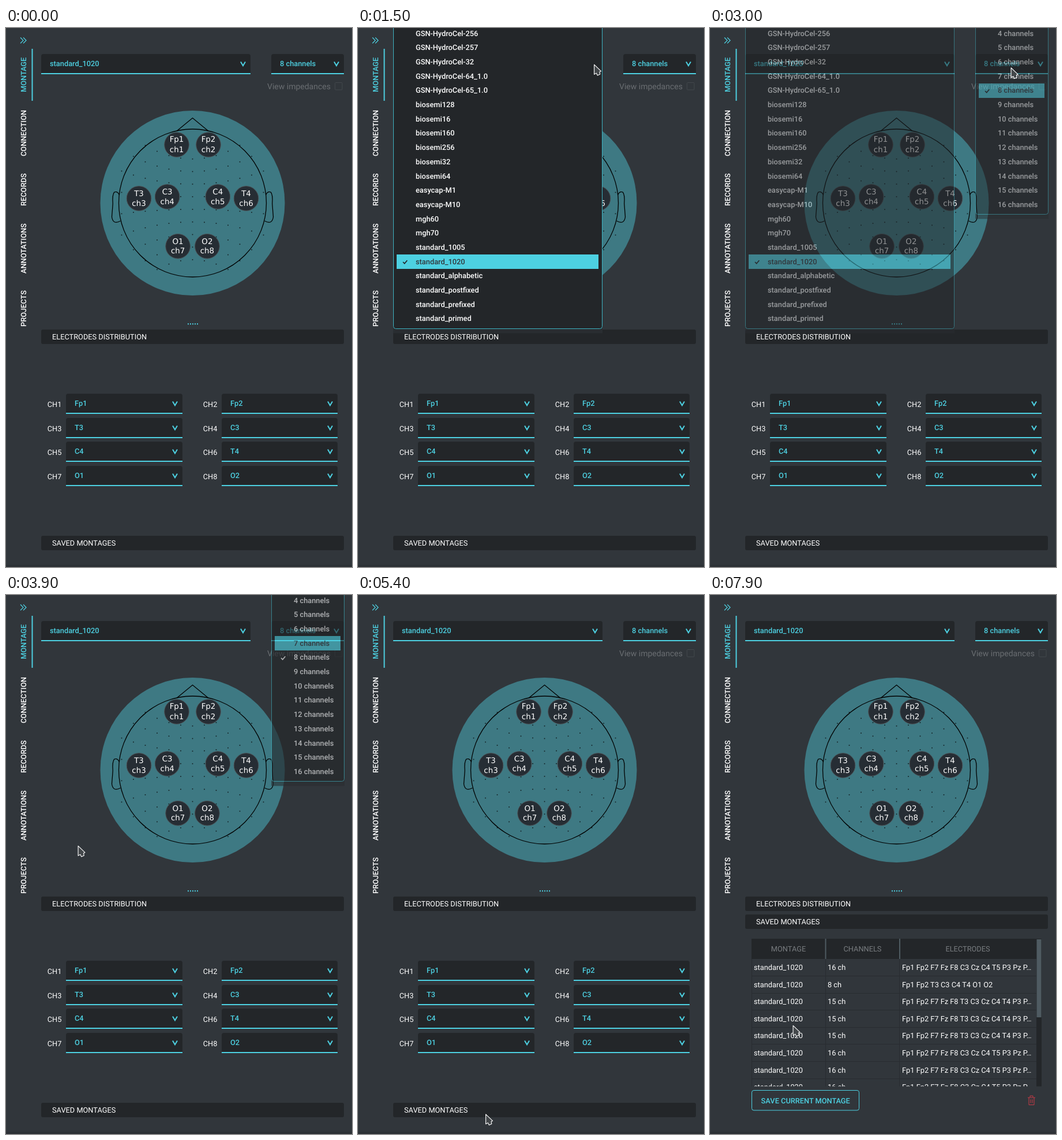
These frames come from a looping animation (600x933 px, 8000 ms). An HTML page:

```html
<!DOCTYPE html>
<html lang="en">
<head>
<meta charset="utf-8">
<title>Montage</title>
<style>
html, body { margin: 0; width: 100%; height: 100%; overflow: hidden; background: #31363b; }
svg { display: block; width: 100vw; height: 100vh; }
text { font: 12.8px Roboto, sans-serif; fill: #fff; white-space: pre; text-rendering: geometricPrecision; }
.bold { font-weight: 500; }
.cyan { fill: #4dd0e1; }
.dark { fill: #31363b; }
.dim { fill: #6a6e72; font-size: 14px; }
.head { fill: #797d80; text-anchor: middle; }
.sensor { font: 13.4px "DejaVu Sans", sans-serif; text-anchor: middle; }
.line { fill: none; stroke: #4dd0e1; }
.ink { fill: none; stroke: #000; stroke-width: 1.3; }
</style>
</head>
<body>
<svg id="stage" viewBox="0 0 600 933" preserveAspectRatio="none"></svg>
<script>
const CYAN = '#4dd0e1', PANEL = '#232629', GRID = '#282c30', SLATE = '#4f5b62';
const ROW = 24.67, FIRST_ROW = 9.3;

const text = (x, y, str, cls = '', extra = '') => `<text x="${x}" y="${y}" class="${cls}" ${extra}>${str}</text>`;
const rect = (x, y, w, h, fill, extra = '') => `<rect x="${x}" y="${y}" width="${w}" height="${h}" fill="${fill}" ${extra}/>`;
const circle = (x, y, r, extra) => `<circle cx="${x}" cy="${y}" r="${r}" ${extra}/>`;
const path = (d, cls, extra = '') => `<path d="${d}" class="${cls}" ${extra}/>`;
const group = (id, body) => `<g id="${id}">${body}</g>`;
const range = n => [...Array(n).keys()];
const clamp = v => Math.min(1, Math.max(0, v));

function combo(x, y, w, label) {
  return path(`M${x} ${y + 35}v-31q0-4 4-4h${w - 8}q4 0 4 4v31z`, '', `fill="${PANEL}"`) +
    rect(x, y + 33, w, 2, CYAN) +
    text(x + 15, y + 21.3, label, 'bold cyan') +
    path(`M${x + w - 17} ${y + 13.5}l4 6.8l4-6.8`, 'line', 'stroke-width="2"');
}

const bar = (y, label) => rect(61, y, 525, 25, PANEL, 'rx="3"') + text(80, y + 17, label);

function sidebar() {
  const tabs = [['MONTAGE', 111], ['CONNECTION', 222], ['RECORDS', 308], ['ANNOTATIONS', 425], ['PROJECTS', 517]];
  return path('M25 16.5l5 5l-5 5M30 16.5l5 5l-5 5', 'line', 'stroke-width="1.2"') +
    rect(44.5, 36, 2, 90, CYAN) +
    tabs.map(([name, y], i) =>
      text(0, 0, name, i ? 'bold' : 'bold cyan', `transform="translate(34.8 ${y}) rotate(-90)"`)).join('');
}

// Sensor grid: rows bend away from the ears, columns are evenly spaced.
function sensorDots(radius) {
  return range(9).flatMap(row => range(13).map(col => {
    const x = (col - 6) * 20.5;
    const y = (row - 3.5) * (21.8 + 10 * (x / 100) ** 2);
    return Math.hypot(x, y) < radius ? rect(x - .8, y - .8, 1.6, 1.6, '#10191c') : '';
  })).join('');
}

function sensorPair(site, numbers, channels, dx, y, gap) {
  return [-1, 1].map((side, i) =>
    circle(side * dx, y, 21.3, 'fill="#262d34" stroke="#4b5054"') +
    text(side * dx, y + 4.3 - gap / 2, site + numbers[i], 'sensor') +
    text(side * dx, y + 4.3 + gap / 2, 'ch' + channels[i], 'sensor')).join('');
}

function scalp() {
  const ear = side => path('M127 -14Q130 -21 135.5 -19Q139.5 -15 138.2 1L140 24Q138 38 125 31', 'ink', `transform="scale(${side} 1)"`);
  return `<g transform="translate(323.5 303)">` +
    circle(0, 0, 160, 'fill="#3e7983"') + sensorDots(135) +
    circle(0, 0, 128, 'class="ink"') + path('M-27 -125L0 -147.2L27 -125', 'ink') + ear(1) + ear(-1) +
    sensorPair('Fp', [1, 2], [1, 2], 27.5, -101, 18) +
    sensorPair('T', [3, 4], [3, 6], 93, -8, 16.5) +
    sensorPair('C', [3, 4], [4, 5], 43.8, -11, 16.5) +
    sensorPair('O', [1, 2], [7, 8], 25.4, 74.8, 16.5) + '</g>';
}

function distribution() {
  return ['Fp1', 'Fp2', 'T3', 'C3', 'C4', 'T4', 'O1', 'O2'].map((name, i) => {
    const x = i % 2 ? 374 : 104, y = 633 + Math.round((i >> 1) * 41.6);
    return text(x - 32.3, y + 22.7, 'CH' + (i + 1)) + combo(x, y, 202 - i % 2, name);
  }).join('') + bar(879, 'SAVED MONTAGES');
}

function savedMontages() {
  const sets = {
    16: 'Fp1 Fp2 F7 Fz F8 C3 Cz C4 T5 P3 Pz P…',
    15: 'Fp1 Fp2 F7 Fz F8 T3 C3 Cz C4 T4 P3 P…',
    8: 'Fp1 Fp2 T3 C3 C4 T4 O1 O2'
  };
  const rows = [16, 8, 15, 15, 15, 16, 16, 16].map((n, i) => {
    const y = 649 + i * 29.6;
    return text(76, y, 'standard_1020') + text(204, y, n + ' ch') + text(333, y, sets[n]) +
      rect(72, Math.round(y + 10), 494, 1, GRID);
  }).join('');
  return bar(553, 'SAVED MONTAGES') +
    `<clipPath id="table"><rect x="72" y="595" width="503" height="255.5"/></clipPath><g clip-path="url(#table)">` +
    rows + [72, 200, 328].map(x => rect(x, 630, 1, 221, GRID)).join('') +
    rect(72, 595, 494, 35, PANEL) + rect(199.5, 595, 2, 35, SLATE) + rect(328, 595, 2, 35, SLATE) +
    text(136, 617, 'MONTAGE', 'head') + text(264.5, 617, 'CHANNELS', 'head') + text(447, 617, 'ELECTRODES', 'head') +
    rect(566, 595, 9, 256, PANEL) + rect(566.5, 596, 8, 135, SLATE) + '</g>' +
    rect(72.5, 857.5, 186, 34.5, 'none', `rx="3.5" stroke="${CYAN}"`) +
    text(165.7, 879.6, 'SAVE CURRENT MONTAGE', 'bold cyan', 'text-anchor="middle"') +
    path('M551 870h13M555 869.5v-2.5h5v2.5M553 870v12.5h9v-12.5M556 873v6.5M559 873v6.5', '', 'fill="none" stroke="#c93a47"');
}

function popup(id, x, w, items, checked) {
  const rowY = i => FIRST_ROW + i * ROW;
  const bottom = Math.round(rowY(items.length - 1) + 18) - .5;
  return group(id,
    rect(x, -9, w, bottom + 17, '#292d31') +
    rect(x + .5, -9, w - 1, bottom + 9, PANEL, 'rx="4" stroke="#3db2c1"') +
    rect(x + 6, 0, w - 13, 25, CYAN, 'class="highlight"') +
    items.map((item, i) => text(x + 39, rowY(i) + 4.5, item, 'bold item')).join('') +
    path(`M${x + 17} ${rowY(checked) + 1}l2.7 2.7l4.6-5.4`, 'check', 'fill="none" stroke-width="1.7"'));
}

const el = id => document.getElementById(id);
const show = (id, on) => { el(id).style.display = on ? '' : 'none'; };

function highlight(id, index, checked) {
  const box = el(id);
  box.querySelector('.highlight').setAttribute('y', Math.round(FIRST_ROW + index * ROW - 12.2));
  box.querySelectorAll('.item').forEach((item, i) => item.classList.toggle('dark', i === index));
  box.querySelector('.check').setAttribute('stroke', index === checked ? PANEL : '#fff');
}

const montages = [
  ...['256', '257', '32', '64_1.0', '65_1.0'].map(n => 'GSN-HydroCel-' + n),
  ...[128, 16, 160, 256, 32, 64].map(n => 'biosemi' + n),
  'easycap-M1', 'easycap-M10', 'mgh60', 'mgh70',
  ...['1005', '1020', 'alphabetic', 'postfixed', 'prefixed', 'primed'].map(n => 'standard_' + n)
];
const channelCounts = range(13).map(i => `${i + 4} channels`);

el('stage').innerHTML =
  rect(0, 0, 600, 933, '#31363b') + rect(0, 929.5, 600, 4, '#2c3035') + sidebar() +
  combo(61, 45, 363, 'standard_1020') + combo(460, 45, 126, '8 channels') +
  text(453, 105.5, 'View impedances', 'dim') + rect(570.5, 94.5, 12.5, 12.5, 'none', 'rx="1" stroke="#43484c"') +
  scalp() + range(5).map(i => rect(315 + i * 4, 511.3, 2, 2, CYAN)).join('') +
  bar(522, 'ELECTRODES DISTRIBUTION') +
  group('distribution', distribution()) + group('saved', savedMontages()) +
  popup('montages', 61, 363, montages, 16) + popup('channels', 460, 127, channelCounts, 4) +
  group('cursor', path('M.6 .8V17.8L4.2 15.6L6.3 19.6L10.8 17.4L10 13.6L12.4 12.2Z', '',
    'fill="#44484b" stroke="#fff" stroke-width="1.1" stroke-linejoin="round"'));

highlight('montages', 16, 16);

// Pointer moves: start and end in tenths of a second, then the place reached.
const moves = [
  [8, 13, 409, 62.5], [21, 24, 521.5, 68], [34, 39, 124.5, 433.5], [40, 43, 160, 509], [43, 44, 217, 661],
  [45, 50, 278, 790], [50, 54, 221, 898], [61, 64, 387.5, 786.5], [64, 68, 185, 740], [69, 76, 147, 700],
  [77, 79, 143.5, 744.5]
];

function pointerAt(t) {
  return moves.reduce(([px, py], [start, end, x, y]) => {
    const p = clamp((t - start) / (end - start)), ease = p * p * (3 - 2 * p);
    return [px + (x - px) * ease, py + (y - py) * ease];
  }, [443, 3]);
}

const fade = (t, open, close, length) => Math.min(clamp((t - open) / 2), 1 - clamp((t - close) / length));

function draw(now) {
  const t = Math.floor((now % 8000) / 100);
  show('cursor', t >= 8);
  el('cursor').setAttribute('transform', `translate(${pointerAt(t)})`);
  el('montages').setAttribute('opacity', fade(t, 13, 29, 2));
  el('channels').setAttribute('opacity', fade(t, 29, 38, 2.6));
  highlight('channels', t < 35 ? 4 : 3, 4);
  show('distribution', t < 57);
  show('saved', t >= 57);
}

const start = performance.now();
function tick() {
  draw(performance.now() - start);
  requestAnimationFrame(tick);
}
tick();
</script>
</body>
</html>
```
